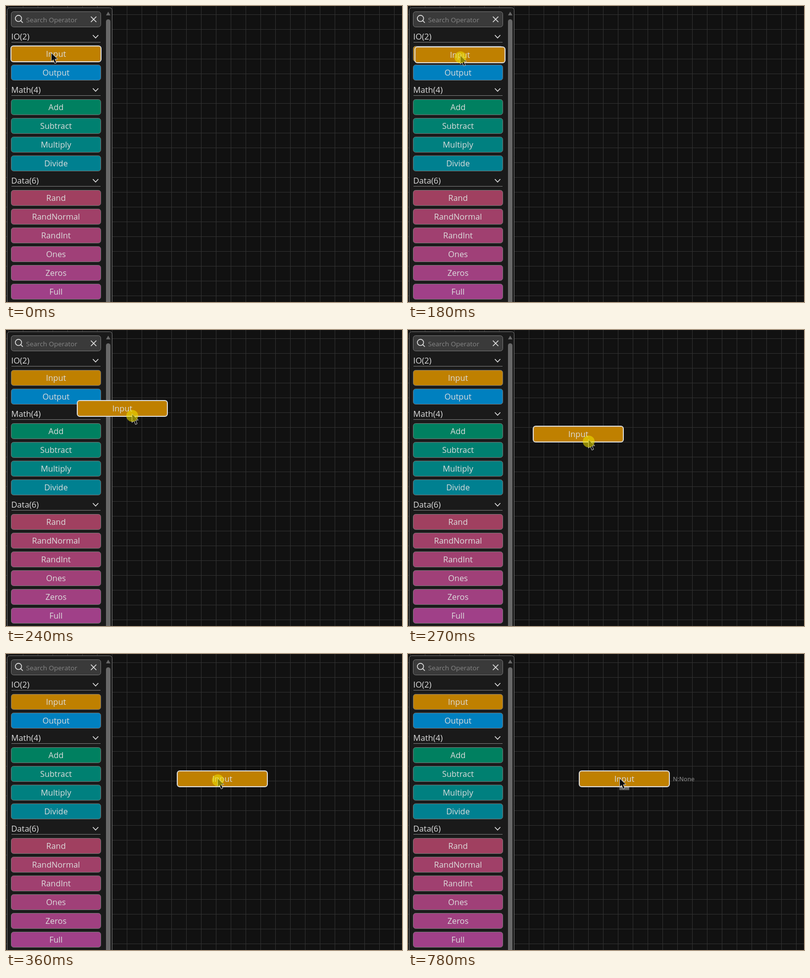
These frames come from a looping animation (800x600 px, 1530 ms). An HTML page with a canvas:

```html
<!DOCTYPE html>
<html lang="en">
<head>
<meta charset="utf-8">
<title>Operator panel</title>
<style>
html, body { margin: 0; width: 100%; height: 100%; overflow: hidden; background: #111; }
canvas { display: block; }
</style>
</head>
<body>
<canvas id="stage" width="800" height="600"></canvas>
<script>
const ctx = document.getElementById('stage').getContext('2d');
const LOOP = 1530, STEP = 30, PRESS = 150, DROP = 750, LABEL = 780;
const FONT = '"Open Sans", "Noto Sans", sans-serif';
const TEXT = '#ddd', EDGE = '#777', AMBER = '#bf8000';

const groups = [
  { name: 'IO(2)', y: 62, items: [['Input', AMBER], ['Output', '#0080bf']] },
  { name: 'Math(4)', y: 170, items: [
    ['Add', '#008060'], ['Subtract', '#008070'], ['Multiply', '#008080'], ['Divide', '#008090']] },
  { name: 'Data(6)', y: 354, items: [
    ['Rand', '#a04060'], ['RandNormal', '#a04068'], ['RandInt', '#a04070'],
    ['Ones', '#a04078'], ['Zeros', '#a04080'], ['Full', '#a04088']] }
];

// Drag positions, one per STEP from PRESS on: pointer centre and node centre.
const pointerPath = [[92, 99], [106, 104], [149, 124], [255, 174], [365, 226], [410, 247], [427, 255], [428, 256]];
const nodePath = [[101, 97], [105, 99], [133, 111], [235, 159], [344, 211], [403, 238], [431, 251], [437, 253]];

function box(x, y, w, h, r, fill, stroke, line = 1) {
  const i = line / 2;
  ctx.beginPath();
  ctx.roundRect(x + i, y + i, w - line, h - line, r);
  ctx.fillStyle = fill;
  ctx.fill();
  ctx.strokeStyle = stroke;
  ctx.lineWidth = line;
  ctx.stroke();
}

function label(str, x, y, size, color = TEXT, align = 'left', weight = 400) {
  ctx.font = `${weight} ${size}px ${FONT}`;
  ctx.textAlign = align;
  ctx.fillStyle = color;
  ctx.fillText(str, x, y);
}

function path(points, color, width) {
  ctx.beginPath();
  points.forEach(([x, y]) => ctx.lineTo(x, y));
  ctx.strokeStyle = color;
  ctx.lineWidth = width;
  ctx.stroke();
}

function button(name, color, cx, cy, selected) {
  if (selected) box(cx - 92, cy - 17, 184, 34, 5, color, TEXT, 2);
  else box(cx - 91, cy - 16, 182, 32, 5, color, EDGE);
  label(name, cx, cy + 6, 16.4, TEXT, 'center');
}

function grid() {
  ctx.fillStyle = '#111';
  ctx.fillRect(0, 0, 800, 600);
  ctx.fillStyle = '#323232';
  for (let x = 4; x < 800; x += 30) ctx.fillRect(x, 0, 1, 600);
  for (let y = 17; y < 600; y += 30) ctx.fillRect(0, y, 800, 1);
}

function searchBox() {
  box(10, 11, 182, 32, 5, '#3a3a3a', EDGE);
  ctx.beginPath();
  ctx.arc(25.2, 25.2, 6.3, 0, 7);
  ctx.strokeStyle = TEXT;
  ctx.lineWidth = 1.6;
  ctx.stroke();
  path([[29.7, 29.7], [34, 34]], TEXT, 1.7);
  label('Search Operator', 40.5, 33, 13.5, '#868686');
  path([[171.5, 21.5], [182.5, 32.5]], TEXT, 1.7);
  path([[182.5, 21.5], [171.5, 32.5]], TEXT, 1.7);
}

function scrollbar() {
  ctx.fillStyle = '#686868';
  ctx.beginPath();
  ctx.moveTo(206.5, 11.5);
  ctx.lineTo(211, 19);
  ctx.lineTo(202, 19);
  ctx.fill();
  ctx.beginPath();
  ctx.roundRect(202, 27, 9, 590, 4.5);
  ctx.fill();
}

function panel(selectInput) {
  box(2, 3, 213, 620, 5, '#1a1a1a', EDGE);
  searchBox();
  scrollbar();
  for (const { name, y, items } of groups) {
    label(name, 10.5, y + 6, 16.6);
    path([[175.5, y - 3], [181, y + 2.8], [186.5, y - 3]], TEXT, 1.7);
    ctx.fillStyle = '#808080';
    ctx.fillRect(11, y + 11, 180, 1);
    items.forEach(([text, color], i) =>
      button(text, color, 101, y + 35 + i * 38, selectInput && text === 'Input'));
  }
}

function pointer(cx, cy, pressed) {
  ctx.save();
  ctx.translate(cx - 0.5, cy - 4);
  ctx.beginPath();
  [[0, 0], [0, 17.5], [4, 14], [7, 21.5], [10.5, 20], [7.5, 12.8], [12.8, 12.6]]
    .forEach(([x, y]) => ctx.lineTo(x, y));
  ctx.closePath();
  ctx.fillStyle = '#0c0c0c';
  ctx.fill();
  ctx.strokeStyle = '#d0d0d0';
  ctx.lineWidth = 1;
  ctx.stroke();
  ctx.restore();
  if (!pressed) return;
  ctx.beginPath();
  ctx.arc(cx, cy, 12, 0, 7);
  ctx.fillStyle = 'rgba(240, 225, 0, 0.57)';
  ctx.fill();
}

function nodeInfo() {
  label('N:None', 535, 258, 12, '#777', 'left', 600);
  ctx.fillStyle = '#5c5c5c';
  ctx.fillRect(427, 268, 20, 8);
  label('None', 437, 273, 8, '#999', 'center');
}

function draw(t) {
  const last = pointerPath.length - 1;
  const i = Math.max(0, Math.min(last, Math.floor((t - PRESS) / STEP)));
  grid();
  panel(i === 0);
  if (t >= LABEL) nodeInfo();
  if (i > 0) button('Input', AMBER, ...nodePath[i], true);
  pointer(...pointerPath[i], t >= PRESS && t < DROP);
}

const start = performance.now();
function tick() {
  draw((performance.now() - start) % LOOP);
  requestAnimationFrame(tick);
}
tick();
</script>
</body>
</html>
```
